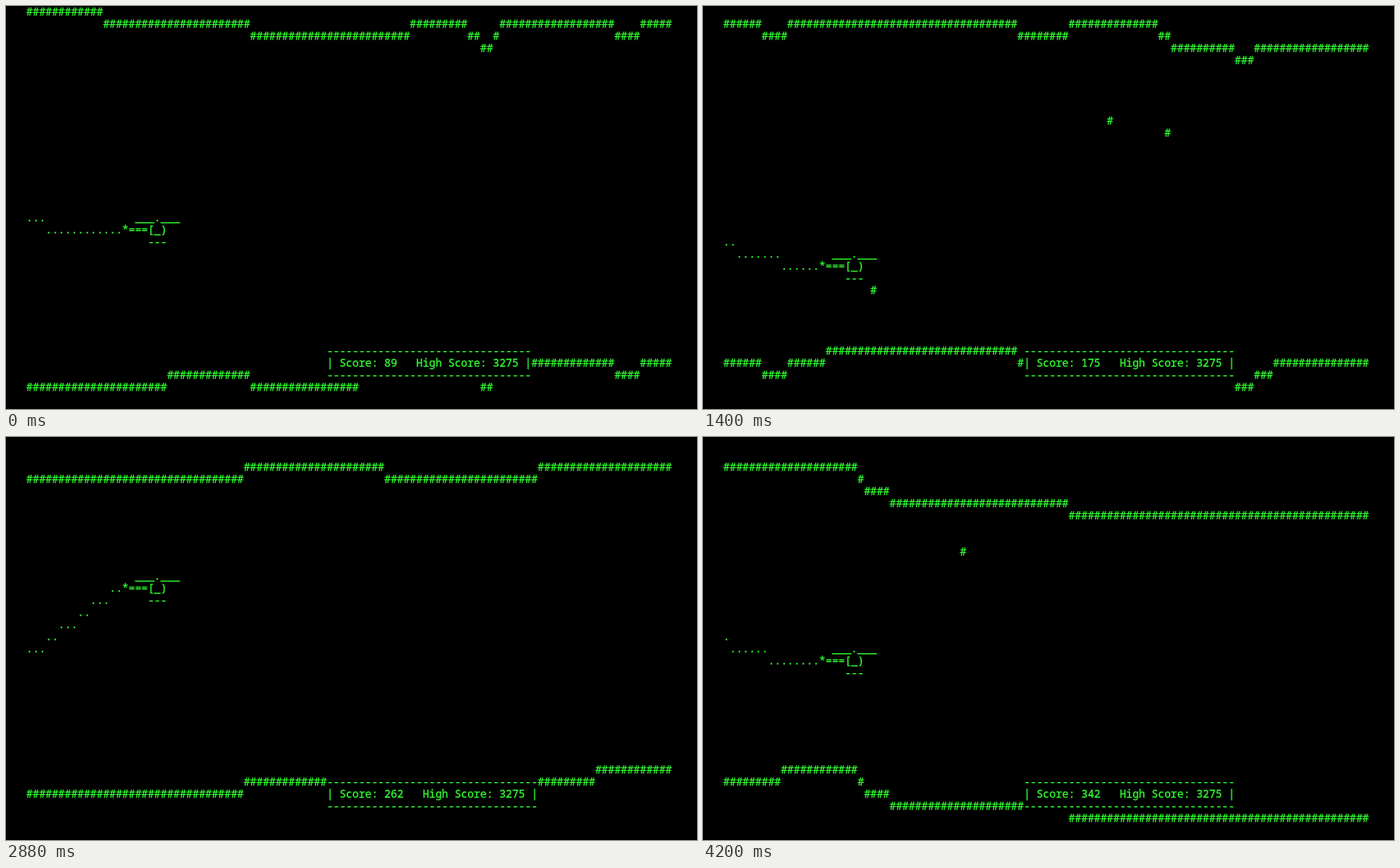
An HTML page with a canvas that plays this animation: 800 px wide and 466 px high, repeating every 4240 ms.

```html
<!DOCTYPE html>
<html lang="en">
<head>
<meta charset="utf-8">
<title>Cave flight</title>
<style>
html, body { margin: 0; width: 100%; height: 100%; overflow: hidden; background: #000; }
canvas { display: block; }
</style>
</head>
<body>
<canvas id="stage" width="800" height="466"></canvas>
<script>
const COLS = 101, ROWS = 33, CELL_W = 7.4, CELL_H = 14;
const LOOP = 4240, TICK = 40, START = 89;
const NOSE = 14; // last column of the smoke trail

// [time, score]; the score is also the distance flown
const pace = [[0, 89], [840, 139], [1400, 175], [2160, 218], [2880, 262], [3440, 296], [4200, 342]];

// [distance, row] where the helicopter turns between climbing and sinking
const turns = [
  [0, 17.98], [57, 21.9], [75, 18.9], [104, 21.6], [117.5, 15.4], [160.8, 20],
  [199.8, 10.1], [203.9, 10.1], [239.9, 17.1], [247.6, 16.6], [268.6, 18.8]
];

// distances at which the cave steps down or up by one row
const drops = [12, 35, 69, 71, 92, 132, 154, 156, 166, 229, 274, 275, 279, 307];
const lifts = [60, 73, 74, 96, 140, 169, 207, 253];

// [distance, row]
const rocks = [[59, 29], [109, 23], [146, 9], [155, 10], [290, 9]];

const ctx = document.getElementById('stage').getContext('2d');

const linear = u => u;
const swing = u => (1 - Math.cos(Math.PI * u)) / 2;

function between(keys, x, ease) {
  const i = Math.max(1, keys.findIndex(([at]) => at >= x));
  const [x0, y0] = keys[i - 1], [x1, y1] = keys[i];
  return y0 + (y1 - y0) * ease((x - x0) / (x1 - x0));
}

const passed = (marks, x) => marks.filter(at => at <= x).length;
const ceilingAt = x => passed(drops, x) - passed(lifts, x);
// the cave narrows by one row at 12 + 10n²
const gapAt = x => x < 12 ? 31 : 30 - Math.floor(Math.sqrt((x - 12) / 10));
const pathAt = x => Math.floor(between(turns, x, swing));

function compose(score) {
  const grid = Array.from({ length: ROWS }, () => Array(COLS).fill(' '));
  const put = (col, row, text) => [...text].forEach((ch, i) => {
    if (col + i >= 0 && col + i < COLS) grid[row][col + i] = ch;
  });
  const shift = score - START;

  for (let c = 0; c < COLS; c++) {
    const x = c + shift, top = ceilingAt(x);
    put(c, top, '#');
    put(c, top + gapAt(x), '#');
    if (c <= NOSE) put(c, pathAt(x), '.');
  }
  for (const [x, row] of rocks) put(x - shift, row, '#');

  const body = pathAt(NOSE + shift);
  put(17, body - 1, '___.___');
  put(15, body, '*===[_)');
  put(19, body + 1, '---');

  const label = `| Score: ${score}   High Score: 3275 |`;
  const rule = '-'.repeat(label.length);
  [rule, label, rule].forEach((line, i) => put(47, 28 + i, line));
  return grid;
}

function draw(now) {
  const t = Math.floor(now % LOOP / TICK) * TICK;
  const score = Math.round(between(pace, t, linear));
  ctx.fillStyle = '#000';
  ctx.fillRect(0, 0, 800, 466);
  ctx.fillStyle = ctx.strokeStyle = '#33ff33';
  ctx.lineWidth = 0.3;
  ctx.font = '12.333px "Noto Sans Mono", "DejaVu Sans Mono", monospace';
  compose(score).forEach((line, r) => line.forEach((ch, c) => {
    if (ch === ' ') return;
    const x = 23.6 + c * CELL_W, y = 11 + r * CELL_H;
    ctx.fillText(ch, x, y);
    ctx.strokeText(ch, x, y);
  }));
}

const begin = performance.now();
function loop() {
  draw(performance.now() - begin);
  requestAnimationFrame(loop);
}
loop();
</script>
</body>
</html>
```
